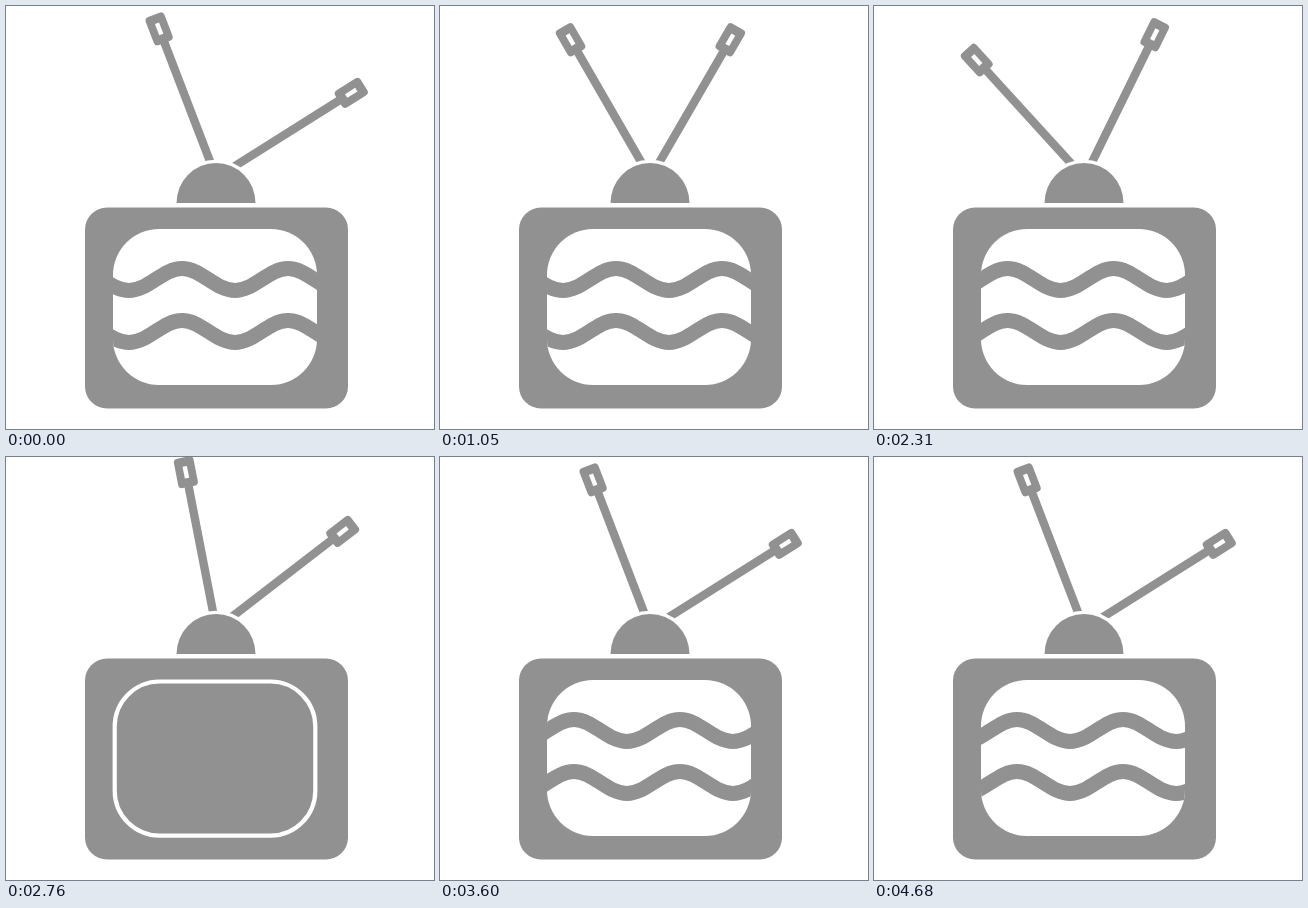
Animation of 428x423 px, one loop 4710 ms. Source, as an HTML page:

```html
<!DOCTYPE html>
<html lang="en">
<head>
<meta charset="utf-8">
<title>Television</title>
<style>
  html, body { margin: 0; width: 100%; height: 100%; overflow: hidden; background: #fff; }
  svg { display: block; width: 428px; height: 423px; }
  .ink { fill: #919191; }
  .wave { fill: none; stroke: #919191; stroke-width: 15; }
</style>
</head>
<body>
<svg viewBox="0 0 428 423">
  <defs>
    <clipPath id="glass"><rect x="107" y="223" width="204" height="156" rx="46"/></clipPath>
    <g id="rod" class="ink">
      <rect x="-4.2" y="-150" width="8.4" height="150"/>
      <rect x="-10" y="-174.5" width="20" height="30" rx="4"/>
      <rect x="-2.2" y="-165.5" width="4.4" height="12" fill="#fff"/>
    </g>
  </defs>

  <use id="left" href="#rod"/>
  <use id="right" href="#rod"/>
  <circle cx="210" cy="197" r="43.3" fill="#fff"/>
  <path class="ink" d="M170.5 197a39.5 40 0 0 1 79 0z"/>
  <rect class="ink" x="79" y="201.5" width="263" height="201" rx="22"/>

  <g id="on" clip-path="url(#glass)">
    <rect x="107" y="223" width="204" height="156" fill="#fff"/>
    <g id="waves"></g>
  </g>
  <rect id="off" x="108.7" y="224.5" width="200.6" height="154.2" rx="45"
        fill="none" stroke="#fff" stroke-width="4.2"/>
</svg>
<script>
const LOOP = 4710, STEP = 30;
const WAVE_LEN = 106, WAVE_MS = 350;
const PIVOT = '210.3 171.8';

// [time in ms, angle in degrees from vertical]
const leftTrack = [
  [0, -21], [100, -10], [350, -60], [590, -30],
  [2190, -30], [2310, -42.4], [2430, -60], [2710, -9], [2760, -11], [2850, -21], [LOOP, -21]
];
const rightTrack = [
  [0, 57.8], [110, 50], [400, 24], [590, 30.1],
  [2190, 30.1], [2310, 26.2], [2400, 24], [2700, 46], [2760, 52.4], [2850, 57.8], [LOOP, 57.8]
];
const blanks = [[150, 510], [2490, 2850]];

const $ = id => document.getElementById(id);

function slope(track, i) {
  const a = track[i], b = track[i + 1];
  return a && b ? (b[1] - a[1]) / (b[0] - a[0]) : 0;
}

// No overshoot past a key: flat at turning points
function tangent(track, i) {
  const a = slope(track, i - 1), b = slope(track, i);
  return a * b > 0 ? 2 * a * b / (a + b) : 0;
}

function sample(track, t) {
  let i = 0;
  while (i < track.length - 2 && t >= track[i + 1][0]) i++;
  const [t0, v0] = track[i], [t1, v1] = track[i + 1];
  const d = t1 - t0, u = (t - t0) / d, w = 1 - u;
  return v0 * w * w * (1 + 2 * u) + v1 * u * u * (3 - 2 * u)
    + d * u * w * (tangent(track, i) * w - tangent(track, i + 1) * u);
}

// A wave with a crest at x = 176, wider than the screen on both sides
function wavePath(crest, trough) {
  const half = WAVE_LEN / 2, c = half * 0.364;
  let x = 176 - 2 * WAVE_LEN, d = `M${x} ${crest}`;
  for (let i = 0; i < 8; i++, x += half) {
    const [a, b] = i % 2 ? [trough, crest] : [crest, trough];
    d += `C${x + c} ${a} ${x + half - c} ${b} ${x + half} ${b}`;
  }
  return `<path class="wave" d="${d}"/>`;
}
$('waves').innerHTML = wavePath(262.5, 284.5) + wavePath(314.5, 336.5);

function draw(t) {
  $('left').setAttribute('transform', `translate(${PIVOT}) rotate(${sample(leftTrack, t)})`);
  $('right').setAttribute('transform', `translate(${PIVOT}) rotate(${sample(rightTrack, t)})`);

  const blank = blanks.some(([from, to]) => t >= from && t < to);
  $('on').style.display = blank ? 'none' : '';
  $('off').style.display = blank ? '' : 'none';

  // The second blank shifts the wave's phase
  const phase = (t < 2700 ? t : t + 111) % WAVE_MS / WAVE_MS;
  $('waves').setAttribute('transform', `translate(${phase * WAVE_LEN} 0)`);
}

const start = performance.now();
function tick() {
  const t = (performance.now() - start) % LOOP;
  draw(Math.floor(t / STEP) * STEP);
  requestAnimationFrame(tick);
}
tick();
</script>
</body>
</html>
```
